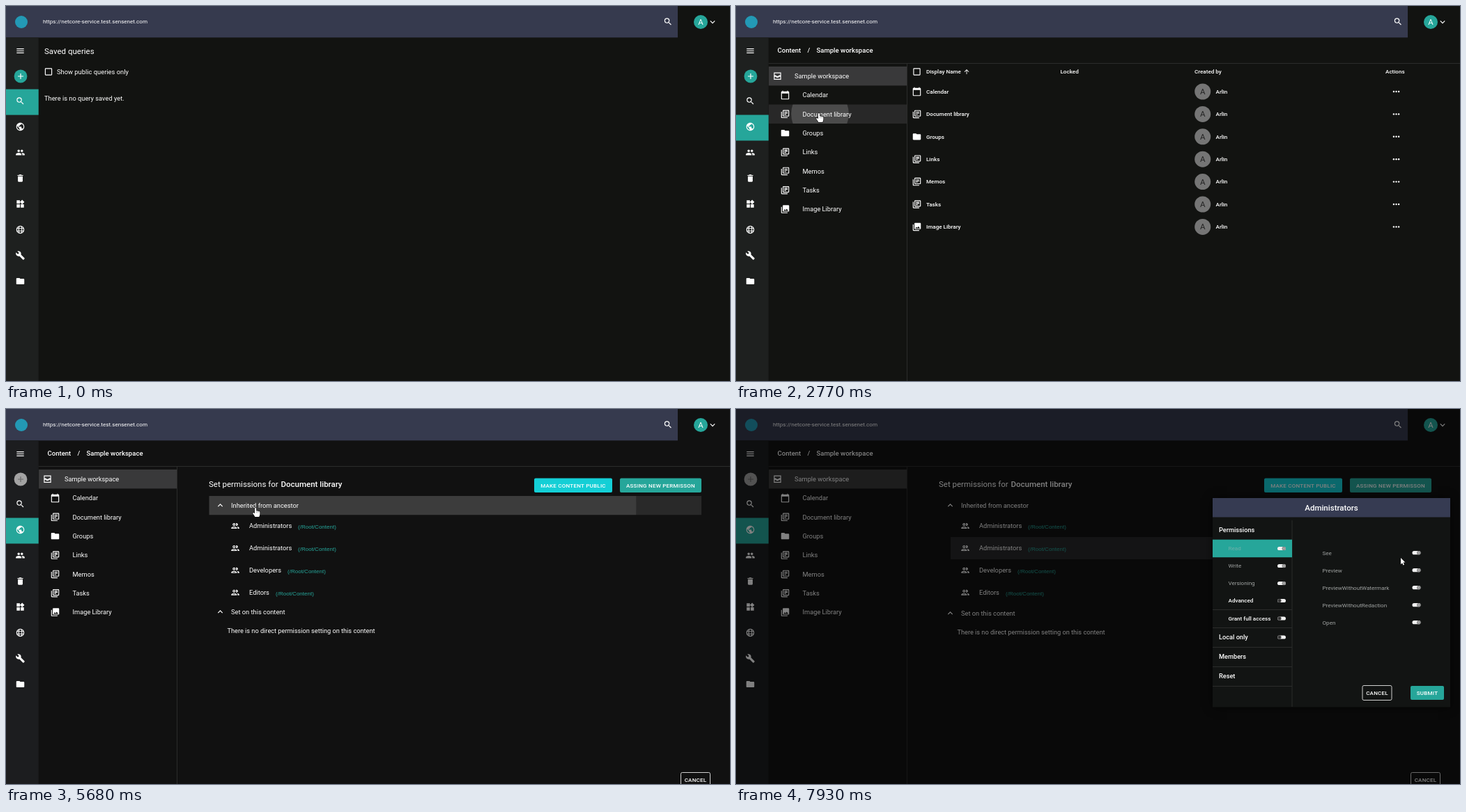
These frames come from a looping animation (1039x539 px, 7990 ms). An HTML page with a canvas:

```html
<!DOCTYPE html>
<html lang="en">
<head>
<meta charset="utf-8">
<title>Permission settings</title>
<style>
html, body { margin: 0; width: 100%; height: 100%; overflow: hidden; background: #121311; }
canvas { display: block; width: 1039px; height: 539px; }
</style>
</head>
<body>
<canvas id="stage"></canvas>
<script>
const W = 1039, H = 539, LOOP = 7990;
const TEAL = '#26a69a', NAVY = '#363a4e', WHITE = '#fff', LINE = '#2b2c2b';
const USER = 'Arlin';
const canvas = document.getElementById('stage');
const dpr = window.devicePixelRatio || 1;
canvas.width = Math.round(W * dpr);
canvas.height = Math.round(H * dpr);
const ctx = canvas.getContext('2d');

const icons = {
  menu: 'M3 18h18v-2H3zM3 13h18v-2H3zM3 6v2h18V6z',
  search: 'M15.5 14h-.79l-.28-.27A6.471 6.471 0 0 0 16 9.5 6.5 6.5 0 1 0 9.5 16c1.61 0 3.09-.59 4.23-1.57l.27.28v.79l5 4.99L20.49 19l-4.99-5zm-6 0C7.01 14 5 11.99 5 9.5S7.01 5 9.5 5 14 7.01 14 9.5 11.99 14 9.5 14z',
  globe: 'M12 2C6.48 2 2 6.48 2 12s4.48 10 10 10 10-4.48 10-10S17.52 2 12 2zm-1 17.93c-3.95-.49-7-3.85-7-7.93 0-.62.08-1.21.21-1.79L9 15v1c0 1.1.9 2 2 2v1.93zm6.9-2.54c-.26-.81-1-1.39-1.9-1.39h-1v-3c0-.55-.45-1-1-1H8v-2h2c.55 0 1-.45 1-1V7h2c1.1 0 2-.9 2-2v-.41c2.93 1.19 5 4.06 5 7.41 0 2.08-.8 3.97-2.1 5.39z',
  people: 'M16 11c1.66 0 2.99-1.34 2.99-3S17.66 5 16 5c-1.66 0-3 1.34-3 3s1.34 3 3 3zm-8 0c1.66 0 2.99-1.34 2.99-3S9.66 5 8 5C6.34 5 5 6.34 5 8s1.34 3 3 3zm0 2c-2.33 0-7 1.17-7 3.5V19h14v-2.5c0-2.33-4.67-3.5-7-3.5zm8 0c-.29 0-.62.02-.97.05 1.16.84 1.97 1.97 1.97 3.45V19h6v-2.5c0-2.33-4.67-3.5-7-3.5z',
  trash: 'M6 19c0 1.1.9 2 2 2h8c1.1 0 2-.9 2-2V7H6v12zM19 4h-3.5l-1-1h-5l-1 1H5v2h14V4z',
  widgets: 'M13 13v8h8v-8h-8zM3 21h8v-8H3v8zM3 3v8h8V3H3zm13.66-1.31L11 7.34 16.66 13l5.66-5.66-5.66-5.65z',
  wrench: 'M22.7 19l-9.1-9.1c.9-2.3.4-5-1.5-6.9-2-2-5-2.4-7.4-1.3L9 6 6 9 1.6 4.7C.4 7.1.9 10.1 2.9 12.1c1.9 1.9 4.6 2.4 6.9 1.5l9.1 9.1c.4.4 1 .4 1.4 0l2.3-2.3c.5-.4.5-1.1.1-1.4z',
  folder: 'M10 4H4c-1.1 0-1.99.9-1.99 2L2 18c0 1.1.9 2 2 2h16c1.1 0 2-.9 2-2V8c0-1.1-.9-2-2-2h-8l-2-2z',
  books: 'M4 6H2v14c0 1.1.9 2 2 2h14v-2H4V6zm16-4H8c-1.1 0-2 .9-2 2v12c0 1.1.9 2 2 2h12c1.1 0 2-.9 2-2V4c0-1.1-.9-2-2-2zm0 14H8V4h12v12zM10 9h8v2h-8zM10 12h4v2h-4zM10 6h8v2h-8z',
  calendar: 'M20 3h-1V1h-2v2H7V1H5v2H4c-1.1 0-2 .9-2 2v16c0 1.1.9 2 2 2h16c1.1 0 2-.9 2-2V5c0-1.1-.9-2-2-2zm0 18H4V8h16v13z',
  photos: 'M22 16V4c0-1.1-.9-2-2-2H8c-1.1 0-2 .9-2 2v12c0 1.1.9 2 2 2h12c1.1 0 2-.9 2-2zm-11-4l2.03 2.71L16 11l4 5H8l3-4zM2 6v14c0 1.1.9 2 2 2h14v-2H4V6H2z',
  trays: 'M3 3h18v18H3zM5 5v5h3l2 2h4l2-2h3V5zM5 14v5h14v-5h-3l-2 2h-4l-2-2z',
  group: 'M9 13.75c-2.34 0-7 1.17-7 3.5V19h14v-1.75c0-2.33-4.66-3.5-7-3.5zM4.34 17c.84-.58 2.87-1.25 4.66-1.25s3.82.67 4.66 1.25H4.34zM9 12c1.93 0 3.5-1.57 3.5-3.5S10.93 5 9 5 5.5 6.57 5.5 8.5 7.07 12 9 12zm0-5c.83 0 1.5.67 1.5 1.5S9.83 10 9 10s-1.5-.67-1.5-1.5S8.17 7 9 7zm7.04 6.81c1.16.84 1.96 1.96 1.96 3.44V19h4v-1.75c0-2.02-3.5-3.17-5.96-3.44zM15 12c1.93 0 3.5-1.57 3.5-3.5S16.93 5 15 5c-.54 0-1.04.13-1.5.35.63.89 1 1.98 1 3.15s-.37 2.26-1 3.15c.46.22.96.35 1.5.35z',
  up: 'M4 12l1.41 1.41L11 7.83V20h2V7.83l5.58 5.59L20 12l-8-8-8 8z',
  check: 'M5 3h14q2 0 2 2v14q0 2-2 2H5q-2 0-2-2V5q0-2 2-2zM5 5v14h14V5z'
};
for (const k in icons) icons[k] = new Path2D(icons[k]);
const hand = new Path2D('M-1 .8Q0-.8 1.2.8V4.5Q2.2 3.9 3 4.8Q4 4.2 4.8 5.2Q6.2 4.8 6.4 6.4V9Q6.2 11 5.2 13H-.6Q-1.6 11-3.6 8.4Q-4 6.8-2.4 7L-1 8.2Z');
const arrow = new Path2D('M0 0V9.2L2.1 7.2L3.5 10.4L5 9.7L3.6 6.6H6.4Z');

const clamp = v => Math.max(0, Math.min(1, v));
const ramp = (t, from, len) => clamp((t - from) / len);
const between = (t, a, b) => t >= a && t < b;

// cubic-bezier(.4, 0, .2, 1)
function ease(x) {
  let lo = 0, hi = 1, s = x;
  for (let i = 0; i < 18; i++) {
    s = (lo + hi) / 2;
    const px = 1.2 * s * (1 - s) ** 2 + 0.6 * s * s * (1 - s) + s ** 3;
    if (px < x) lo = s; else hi = s;
  }
  return 3 * s * s * (1 - s) + s ** 3;
}

function box(x, y, w, h, color) {
  ctx.fillStyle = color;
  ctx.fillRect(x, y, w, h);
}
function round(x, y, w, h, r, color) {
  ctx.fillStyle = color;
  ctx.beginPath();
  ctx.roundRect(x, y, w, h, r);
  ctx.fill();
}
function disc(x, y, r, color) {
  ctx.fillStyle = color;
  ctx.beginPath();
  ctx.arc(x, y, r, 0, 7);
  ctx.fill();
}
function text(s, x, y, size = 9.27, { weight = 400, color = WHITE, align = 'left', font = 'Roboto', gap = 0 } = {}) {
  ctx.font = `${weight} ${size}px ${font}, sans-serif`;
  ctx.letterSpacing = gap + 'px';
  ctx.textAlign = align;
  ctx.fillStyle = color;
  ctx.fillText(s, x, y + size * 0.35);
}
const bold = { weight: 500 };
function icon(name, x, y, size = 13.8, color = WHITE) {
  ctx.save();
  ctx.translate(x - size / 2, y - size / 2);
  ctx.scale(size / 24, size / 24);
  ctx.fillStyle = color;
  ctx.fill(icons[name], 'evenodd');
  ctx.restore();
}
function stroke(color, width, draw) {
  ctx.strokeStyle = color;
  ctx.lineWidth = width;
  ctx.beginPath();
  draw();
  ctx.stroke();
}
function chevron(x, y, dir) {
  stroke(WHITE, 1.2, () => {
    ctx.moveTo(x - 3.2, y - 1.6 * dir);
    ctx.lineTo(x, y + 1.6 * dir);
    ctx.lineTo(x + 3.2, y - 1.6 * dir);
  });
}
function wireGlobe(x, y) {
  stroke(WHITE, 1.1, () => {
    ctx.arc(x, y, 5.2, 0, 7);
    ctx.moveTo(x + 2.3, y);
    ctx.ellipse(x, y, 2.3, 5.2, 0, 0, 7);
    for (const d of [-1.8, 1.8]) {
      ctx.moveTo(x - 4.8, y + d);
      ctx.lineTo(x + 4.8, y + d);
    }
  });
}
function ripple(t, start, x, y, reach, area, alpha) {
  if (!between(t, start, start + 1000)) return;
  const r = reach * ease(ramp(t, start, 550));
  ctx.save();
  ctx.beginPath();
  ctx.rect(...area);
  ctx.clip();
  disc(x, y, r, `rgba(255,255,255,${alpha * (1 - ramp(t, start + 450, 550))})`);
  ctx.restore();
}
function button(label, x, y, w, h, color) {
  if (color) round(x, y, w, h, 2, color);
  else stroke('#d0d0d0', 1, () => ctx.roundRect(x + .5, y + .5, w - 1, h - 1, 2));
  text(label, x + w / 2, y + h / 2, 8, { weight: 500, align: 'center', gap: .23 });
}

const library = [
  ['calendar', 'Calendar'], ['books', 'Document library'], ['folder', 'Groups'], ['books', 'Links'],
  ['books', 'Memos'], ['books', 'Tasks'], ['photos', 'Image Library']
];

function shell(t) {
  const late = t >= 3800, content = t >= 700;
  box(0, 0, W, H, late ? '#111111' : '#121311');
  box(0, 0, 964, 45.3, NAVY);
  box(0, 45.3, 46.7, H, late ? '#1c1d1f' : '#1e201f');
  disc(22, 23, 9, '#2399b5');
  text('https://netcore-service.test.sensenet.com', 53, 22, 8.09);
  icon('search', 950, 22.5);
  disc(997, 23, 10, TEAL);
  text('A', 997, 23, 11.4, { align: 'center' });
  chevron(1014, 23, 1);
  box(0, content ? 156.5 : 119.6, 46.7, 37, TEAL);
  icon('menu', 20.5, 64.5);
  disc(21, 101, 9.4, late ? '#a3a3a3' : TEAL);
  stroke(late ? '#6b6b6b' : WHITE, 1.2, () => {
    ctx.moveTo(17, 101); ctx.lineTo(25, 101);
    ctx.moveTo(21, 97); ctx.lineTo(21, 105);
  });
  ['search', 'globe', 'people', 'trash', 'widgets', '', 'wrench', 'folder'].forEach((name, i) => {
    const y = 136.5 + i * 37;
    if (name) icon(name, 20.5, y); else wireGlobe(20.5, y);
  });
}

function queries() {
  text('Saved queries', 55, 64.5, 11.5);
  icon('check', 61, 94.5);
  text('Show public queries only', 73, 94.5, 9.35);
  text('There is no query saved yet.', 55, 132.5, 9.3);
}

function tree(t, open) {
  box(46.7, 82, W, 1, LINE);
  box(245, 82, 1, H, LINE);
  text('Content', 59.5, 63.5, 9.55, bold);
  if (t < 1020) return;
  if (open) {
    text('/', 102.5, 63.5, 9.55, bold);
    text('Sample workspace', 115.5, 63.5, 9.55, bold);
    box(47, 87, 198, 27.4, '#39393a');
  } else if (t >= 1500) {
    box(47, 87, 198, t < 1700 ? 23 : 27.4, '#292a29');
  }
  ripple(t, 1700, 116, 101, 130, [47, 87, 198, 27.4], .14);
  if (open) {
    if (between(t, 2430, 3000)) box(47, 141.6, 198, 27.4, '#282828');
    ripple(t, 2615, 120.5, 155, 128, [47, 141.6, 198, 27.4], .16);
    if (between(t, 3750, 4440)) box(47, 278.5, 198, 23, '#161616');
  }
  icon('trays', 59.5, 100.7);
  text('Sample workspace', 84, 100.5);
  if (open) library.forEach(([pic, name], i) => {
    const y = 128 + i * 27.35;
    icon(pic, 70.5, y);
    text(name, 95.5, y);
  });
}

function table(rows) {
  icon('check', 259.5, 94.5);
  text('Display Name', 273, 94.5, 8.08, bold);
  icon('up', 331, 94.5, 10.3);
  text('Locked', 465.5, 94.5, 8.08, bold);
  text('Created by', 658, 94.5, 8.08, bold);
  text('Actions', 932, 94.5, 8.08, bold);
  rows.forEach(([pic, name], i) => {
    const y = 123 + i * 32.4;
    icon(pic, 259.5, y);
    text(name, 273, y, 8.08, bold);
    disc(669.7, y, 11.5, '#757575');
    text('A', 669.7, y, 11.5, { align: 'center', color: '#222' });
    text(USER, 688.5, y, 8.08, bold);
    for (const d of [-3.6, 0, 3.6]) disc(947.5 + d, y, 1.2, WHITE);
  });
}

function permissions(t) {
  text('Set permissions for', 291, 108, 11.5);
  text('Document library', 394.5, 108, 11.5, bold);
  button('MAKE CONTENT PUBLIC', 758, 99.5, 112, 20.5, '#14cfd6');
  button('ASSING NEW PERMISSON', 881, 99.5, 117, 20.5, TEAL);
  if (between(t, 4850, 6050)) box(291.5, 125, 706.5, 27.2, '#292929');
  ripple(t, 5400, 360, 139, 690, [291.5, 125, 706.5, 27.2], .09);
  const grow = 128 * ease(ramp(t, 5430, 300));
  chevron(307.5, 138.5, t < 5430 ? 1 : -1);
  text('Inherited from ancestor', 323, 138.5, 9.3);
  if (grow > 0) {
    ctx.save();
    ctx.beginPath();
    ctx.rect(291, 152, 707, grow);
    ctx.clip();
    if (t >= 6100) box(308, 184, 690, 32, '#282829');
    [['Administrators', 419], ['Administrators', 419], ['Developers', 404], ['Editors', 387]].forEach(([name, x], i) => {
      const y = 168 + i * 31.9;
      icon('group', 329, y);
      text(name, 349, y, 9.3);
      text('(/Root/Content)', x, y + 1, 8.04, { color: TEAL, font: '"Liberation Sans"' });
    });
    ctx.restore();
  }
  chevron(307.5, 165.5 + grow, -1);
  text('Set on this content', 323, 165.5 + grow, 9.3);
  text('There is no direct permission setting on this content', 317.5, 193 + grow, 9.2);
  button('CANCEL', 968, 522, 43, 22);
}

function toggle(x, y, on) {
  round(x - 6, y - 2.6, 12, 5.2, 2.6, '#f2f2f2');
  disc(x + (on ? 3.2 : -3.2), y, 2.7, on ? '#8c8c8c' : '#4a4a4a');
  disc(x + (on ? 3.2 : -3.2), y, 1.5, on ? '#a8a8a8' : '#303030');
}

function dialog(alpha) {
  ctx.save();
  ctx.globalAlpha = alpha;
  ctx.shadowColor = 'rgba(0,0,0,.6)';
  ctx.shadowBlur = 12 * dpr;
  box(684, 128, 341, 300.5, '#121413');
  ctx.shadowColor = 'transparent';
  box(684, 128, 341, 27.5, '#363b52');
  text('Administrators', 854.5, 142, 11.5, { weight: 500, align: 'center' });
  box(797.5, 160, 1, 268, LINE);
  for (const y of [288, 314, 342, 370, 398]) box(684, y, 114, 1, LINE);
  text('Permissions', 693, 173.5, 9.2, bold);
  box(684, 187.7, 114, 25.5, TEAL);
  const grey = '#a0a3a2';
  [['Read', 200.5, '#6fb0aa'], ['Write', 225.5, grey], ['Versioning', 250.5, grey],
   ['Advanced', 275.5], ['Grant full access', 301]].forEach(([name, y, color], i) => {
    text(name, 706.5, y, 8.08, { weight: color ? 400 : 500, color: color || WHITE });
    toggle(783, y, i < 3);
  });
  text('Local only', 693, 328, 9.2, bold);
  toggle(783, 328, false);
  text('Members', 693, 356, 9.2, bold);
  text('Reset', 693, 384, 9.2, bold);
  ['See', 'Preview', 'PreviewWithoutWatermark', 'PreviewWithoutRedaction', 'Open'].forEach((name, i) => {
    const y = 206.7 + i * 25;
    text(name, 841.5, y, 8.12, { color: grey });
    toggle(976.5, y, true);
  });
  button('CANCEL', 898.5, 397, 43, 22);
  button('SUBMIT', 968, 398, 48, 20, TEAL);
  ctx.restore();
}

const path = [
  [70, 765, 455], [600, 18, 168], [1180, 18, 168], [1560, 115, 101], [2150, 115, 101], [2500, 119, 154],
  [2900, 119, 154], [3400, 187, 294], [4400, 187, 294], [5000, 358, 142], [5800, 358, 142], [6200, 374, 202],
  [7200, 374, 202], [7610, 753, 250], [7890, 954, 214]
];
const clicks = [600, 1600, 3510, 5400, 6860];

function pointer(t) {
  if (t < 70) return;
  let i = 0;
  while (i < path.length - 2 && t >= path[i + 1][0]) i++;
  const [t0, x0, y0] = path[i], [t1, x1, y1] = path[i + 1];
  let p = ramp(t, t0, t1 - t0);
  if (t0 === 7200) p = p * p;
  else if (t0 === 7610) p = 1 - (1 - p) ** 2;
  else p = p * p * (3 - 2 * p);
  const x = x0 + (x1 - x0) * p, y = y0 + (y1 - y0) * p;
  if (clicks.some(c => between(t, c, c + 140))) disc(x + 1.5, y + 1, 7, 'rgba(190,190,20,.75)');
  const plain = t < 540 || between(t, 1290, 1460) || between(t, 4560, 4850) || t >= 7080;
  const shape = plain ? arrow : hand;
  ctx.save();
  ctx.translate(x, y);
  ctx.lineJoin = 'round';
  ctx.strokeStyle = '#111';
  ctx.lineWidth = 1.4;
  ctx.stroke(shape);
  ctx.fillStyle = WHITE;
  ctx.fill(shape);
  if (!plain) stroke('#777', .5, () => {
    for (const d of [1.2, 3, 4.8]) { ctx.moveTo(d, 5.2); ctx.lineTo(d, 7.4); }
  });
  ctx.restore();
}

function render(t) {
  ctx.setTransform(dpr, 0, 0, dpr, 0, 0);
  shell(t);
  if (t < 700) queries();
  if (t >= 940) tree(t, t >= 1950);
  if (between(t, 1020, 3800)) table(t < 1950 ? [['trays', 'Sample workspace']] : library);
  if (t >= 3800) permissions(t);
  const shade = Math.max(
    ease(ramp(t, 2860, 225)) * (1 - ease(ramp(t, 3560, 195))),
    ease(ramp(t, 7020, 225))
  );
  if (shade > 0) box(0, 0, W, H, `rgba(0,0,0,${shade * .5})`);
  if (t >= 7020) dialog(ease(ramp(t, 7020, 225)));
  pointer(t);
}

const begin = performance.now();
function tick() {
  render((performance.now() - begin) % LOOP);
  requestAnimationFrame(tick);
}
tick();
</script>
</body>
</html>
```
